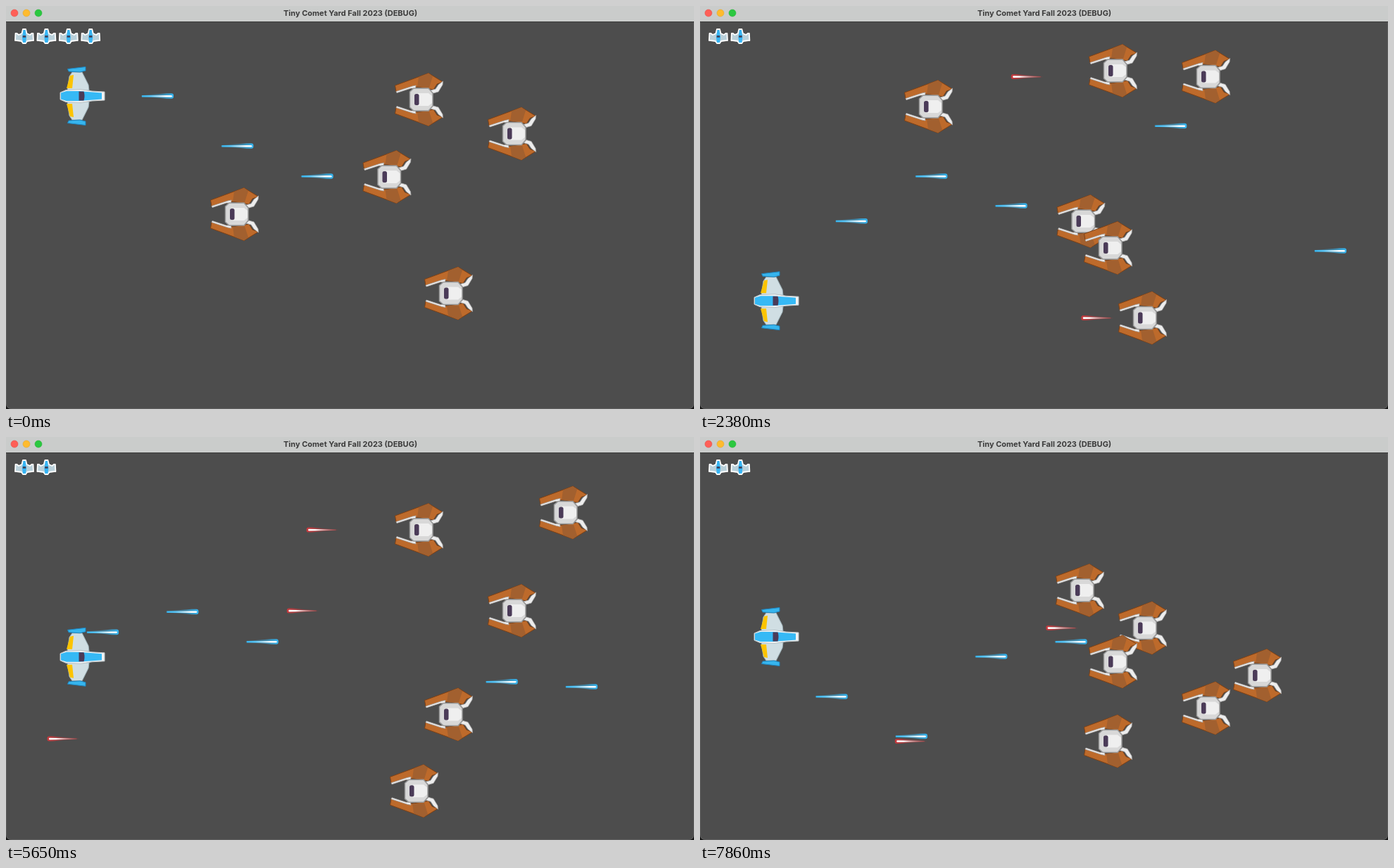
An HTML page that plays this animation: 977 by 573 pixels, repeating every 8000 ms.

```html
<!DOCTYPE html>
<html lang="en">
<head>
<meta charset="utf-8">
<title>Space shooter</title>
<style>
  html, body { margin: 0; width: 100%; height: 100%; overflow: hidden; background: #161616; }
  svg { display: block; width: 100%; height: 100%; }
  text { font: 700 11px Inter, sans-serif; fill: #3b3b3b; text-anchor: middle; }
</style>
</head>
<body>
<svg viewBox="0 0 977 573">
  <defs>
    <linearGradient id="blueFade">
      <stop offset="0" stop-color="#35b5f0" stop-opacity=".2"/>
      <stop offset=".6" stop-color="#35b5f0" stop-opacity=".5"/>
      <stop offset="1" stop-color="#35b5f0"/>
    </linearGradient>
    <linearGradient id="blueCore">
      <stop offset="0" stop-color="#35b5f0"/>
      <stop offset=".3" stop-color="#5cc4f3"/>
      <stop offset=".8" stop-color="#fff"/>
    </linearGradient>
    <linearGradient id="redFade">
      <stop offset="0" stop-color="#c8383c"/>
      <stop offset=".5" stop-color="#b8383c" stop-opacity=".5"/>
      <stop offset="1" stop-color="#b0383c" stop-opacity=".1"/>
    </linearGradient>
    <linearGradient id="redCore">
      <stop offset=".25" stop-color="#fff"/>
      <stop offset="1" stop-color="#c8484a" stop-opacity=".6"/>
    </linearGradient>

    <g id="blue">
      <path d="M0-1 20-2.500 36-3.800H43Q46-3.500 46-1V1Q46 3.500 43 3.800H36L20 2.200 0 1.200Z" fill="url(#blueFade)"/>
      <path d="M1-1H42Q44-1 44 .2T42 1.500H1Z" fill="url(#blueCore)"/>
    </g>
    <g id="red">
      <path d="M3-3.500H8L24-2 45-.6V1L24 2 8 3.500H3Q0 3.500 0 1V-1Q0-3.500 3-3.500Z" fill="url(#redFade)"/>
      <path d="M3-1.200 42-.5V.8L3 1.400Q1.500 0 3-1.200Z" fill="url(#redCore)"/>
    </g>

    <g id="wing">
      <path d="M-14-34H0L5-24 9-16 10-8H-21L-18-28Z" fill="#d0dee3" stroke="#9db1b8"/>
      <path d="M-17-29-12-30-14-11H-22Z" fill="#fcc400"/>
      <path d="M-20.500-38.500 5-41.500V-36L-3-34-19-35Z" fill="#36b5ee" stroke="#1d83bd"/>
    </g>
    <g id="ship">
      <use href="#wing"/><use href="#wing" transform="scale(1 -1)"/>
      <path d="M-31-5-23-8.500-2-9.500 14-7 32-6V6L14 7-2 9.500-23 8.500-31 5Z" fill="#f3f3f3" stroke="#b8c2c6"/>
      <path d="M-30-4.500-22-7H-5L28-4.500V4.500L-5 7H-22L-30 4.500Z" fill="#36b9f5"/>
      <path d="M-4.500-6.500H2.500Q4.500 0 2.500 6.500H-4.500Z" fill="#4b3b58"/>
    </g>

    <g id="claw">
      <path d="M-34.500-20 13-37.500 33.500-25 25-22 20-14 9-16-3-18-33-11Z" fill="#bd6a2b" stroke="#7c4015"/>
      <path d="M-1-32 13-37.500 19-33 14-17-3-18Z" fill="#a2602f"/>
      <path d="M-33-11.500-10-19-5-20-5.500-16-12-16-32-9.500Z" fill="#f0f0f0" stroke="#a8a8a8" stroke-width=".8"/>
      <path d="M33.500-26 33-21 27-11 20-9 16-13 23-15 27-21Z" fill="#ededed" stroke="#a8a8a8" stroke-width=".8"/>
    </g>
    <g id="enemy">
      <use href="#claw"/><use href="#claw" transform="scale(1 -1)"/>
      <path d="M-13.500-11-8-16H13L19-9V9L13 16H-8L-13.500 11Z" fill="#d8d8d8" stroke="#999" stroke-width="1.500"/>
      <path d="M-2-9H13L18-5V5L13 9H-2Z" fill="#efefef"/>
      <rect x="-7" y="-8" width="6.500" height="16" rx="2.500" fill="#4b3b58"/>
    </g>

    <g id="life">
      <path d="M-2-10H2L3.500-4 8-2 10.500-4H12.500L13 6H11L4 7 2 10H-2L-4 7-11 6H-13L-12.500-4H-10.500L-8-2-3.500-4Z" fill="#b9d0da" stroke="#fff" stroke-width="1.800" stroke-linejoin="round"/>
      <path d="M-1.500-9H1.500L3 2 2 9H-2L-3 2Z" fill="#36b5f5"/>
      <path d="M-2.200-1H2.200V1.800H-2.200Z" fill="#3b4560"/>
    </g>
    <clipPath id="field"><path d="M0 23H977V565Q977 573 969 573H8Q0 573 0 565Z"/></clipPath>
  </defs>

  <path d="M0 20H977V565Q977 573 969 573H8Q0 573 0 565Z" fill="#4d4d4d"/>
  <path d="M.5 23V565Q.5 572.500 8 572.500H969Q976.500 572.500 976.500 565V23" fill="none" stroke="#646464" stroke-width=".8"/>
  <g id="scene" clip-path="url(#field)"></g>
  <rect width="977" height="22" fill="#cacccb"/>
  <rect y="22" width="977" height="1" fill="#3a3a3a"/>
  <circle cx="12" cy="10" r="5" fill="#fe5f57" stroke="#e0443e" stroke-width=".5"/>
  <circle cx="29" cy="10" r="5" fill="#febb2e" stroke="#dfa023" stroke-width=".5"/>
  <circle cx="46" cy="10" r="5" fill="#2bc840" stroke="#1eac2f" stroke-width=".5"/>
  <text x="489" y="14">Tiny Comet Yard Fall 2023 (DEBUG)</text>
</svg>
<script>
// Game time runs in ticks of 1/60 s, speeds are px per tick.
const LOOP = 8000, STEP = 148.5, LAST = 53, TICKS = 8.98;
const FAST = 7.083;               // player and all shots
const ENTRY = 4.25, DRIFT = 2.125; // enemies arriving / patrolling
const RELOAD = 16, WAIT = 61;     // ticks between player shots; enemy pause
const TOP = 88.5, BOTTOM = 504.5; // patrol limits
const REACH = 36;                 // vertical hit distance
const SHIP_X = 108, MUZZLE = 78.7;
const scene = document.getElementById('scene');

// Turning points: the player rests, then leaves just in time to be there
const turns = [
  [-48, 242], [-32, 199], [-16, 128], [32, 348], [64, 170.5], [95, 284],
  [112, 242], [154, 490], [192, 327], [208, 306], [224, 284], [240, 355],
  [267, 270], [304, 291], [320, 248.5], [343, 327], [368, 419], [384, 433],
  [416, 291], [432, 312], [448, 425.5], [476, 284]
];

function playerY(t) {
  const i = turns.findIndex(([at]) => t <= at);
  const [at, y] = turns[i];
  const gap = i ? turns[i - 1][1] - y : 0;
  return y + Math.sign(gap) * Math.min(Math.abs(gap), (at - t) * FAST);
}

const bounce = y => y < TOP ? 2 * TOP - y : y > BOTTOM ? 2 * BOTTOM - y : y;

// Every enemy repeats: travel, pause, fire, pause
function makeEnemy(x, y, leave, moves, { hp = 6, arrives = 0 } = {}) {
  const legs = [], shots = [];
  const fire = (at, from) => shots.push({ at, x: x - 23, y: from, end: Infinity });
  let t = leave, at = y;
  if (leave > WAIT) if (!arrives) fire(leave - WAIT, y);
  for (const d of moves) {
    legs.push({ t, y: at, d });
    t += Math.abs(d) / DRIFT;
    at = bounce(at + d);
    fire(t + WAIT, at);
    t += 2 * WAIT;
  }
  return { x, y, legs, shots, hp, arrives, end: Infinity };
}

const enemies = [
  makeEnemy(325, 296, 72, [-391], { hp: 5 }),
  makeEnemy(541.5, 243, 91, [63], { hp: 4 }),
  makeEnemy(629, 408.5, 0, [157, -14.5, -157.5]),
  makeEnemy(719, 181.5, 9, [-81, 146.5, 138.5]),
  makeEnemy(587, 133, 100.5, [-41, 40, 187.5]),
  makeEnemy(580, 260, 104.5, [176, 140.5], { arrives: 104.5 }),
  makeEnemy(792, 279.5, 260, [-441.5], { arrives: 260 }),
  makeEnemy(540, 218, 476, [], { arrives: 476 })
];

const enemyX = (e, t) => e.x + ENTRY * Math.max(0, e.arrives - t);

function enemyY(e, t) {
  const leg = e.legs.filter(l => l.t <= t).pop();
  if (!leg) return e.y;
  return bounce(leg.y + Math.sign(leg.d) * Math.min(Math.abs(leg.d), (t - leg.t) * DRIFT));
}

const blueX = (s, t) => MUZZLE + FAST * (t - s.at);
const redX = (s, t) => s.x - FAST * (t - s.at);
const flying = (s, t) => t > s.at && t < s.end;

// Play the battle once, noting when each shot and enemy ends
const blues = [], reds = enemies.flatMap(e => e.shots);
for (let t = turns[0][0]; t <= LAST * TICKS; t++) {
  if (t % RELOAD === 0) blues.push({ at: t, y: playerY(t), end: Infinity });
  for (const s of blues) {
    if (!flying(s, t)) continue;
    const tip = blueX(s, t) + 46;
    const hit = enemies.find(e => t < e.end && Math.abs(tip - enemyX(e, t) - 8) < 28 &&
      Math.abs(s.y - enemyY(e, t)) < REACH);
    if (!hit) continue;
    s.end = t;
    if (--hit.hp === 0) {
      hit.end = t;
      hit.shots.forEach(r => { if (r.at > t) r.at = Infinity; });
    }
  }
  for (const s of reds) {
    if (flying(s, t) && Math.abs(redX(s, t) - 87) < 11 &&
      Math.abs(s.y - playerY(t)) < REACH) s.end = t;
  }
}

const put = (id, x, y) =>
  `<use href="#${id}" transform="translate(${x.toFixed(1)} ${y.toFixed(1)})"/>`;

function draw(t) {
  let out = '';
  const lives = 4 - reds.filter(s => s.end <= t).length;
  for (let i = 0; i < lives; i++) out += put('life', 26 + 31.4 * i, 43);
  for (const s of reds) if (flying(s, t)) out += put('red', redX(s, t), s.y);
  for (const e of enemies) if (t < e.end) out += put('enemy', enemyX(e, t), enemyY(e, t));
  out += put('ship', SHIP_X, playerY(t));
  for (const s of blues) if (flying(s, t)) out += put('blue', blueX(s, t), s.y);
  scene.innerHTML = out;
}

let shown = -1;
function tick(now) {
  const step = Math.min(LAST, Math.floor((now % LOOP + 12) / STEP));
  if (step !== shown) draw(Math.round((shown = step) * TICKS));
  requestAnimationFrame(tick);
}
tick(0);
</script>
</body>
</html>
```
